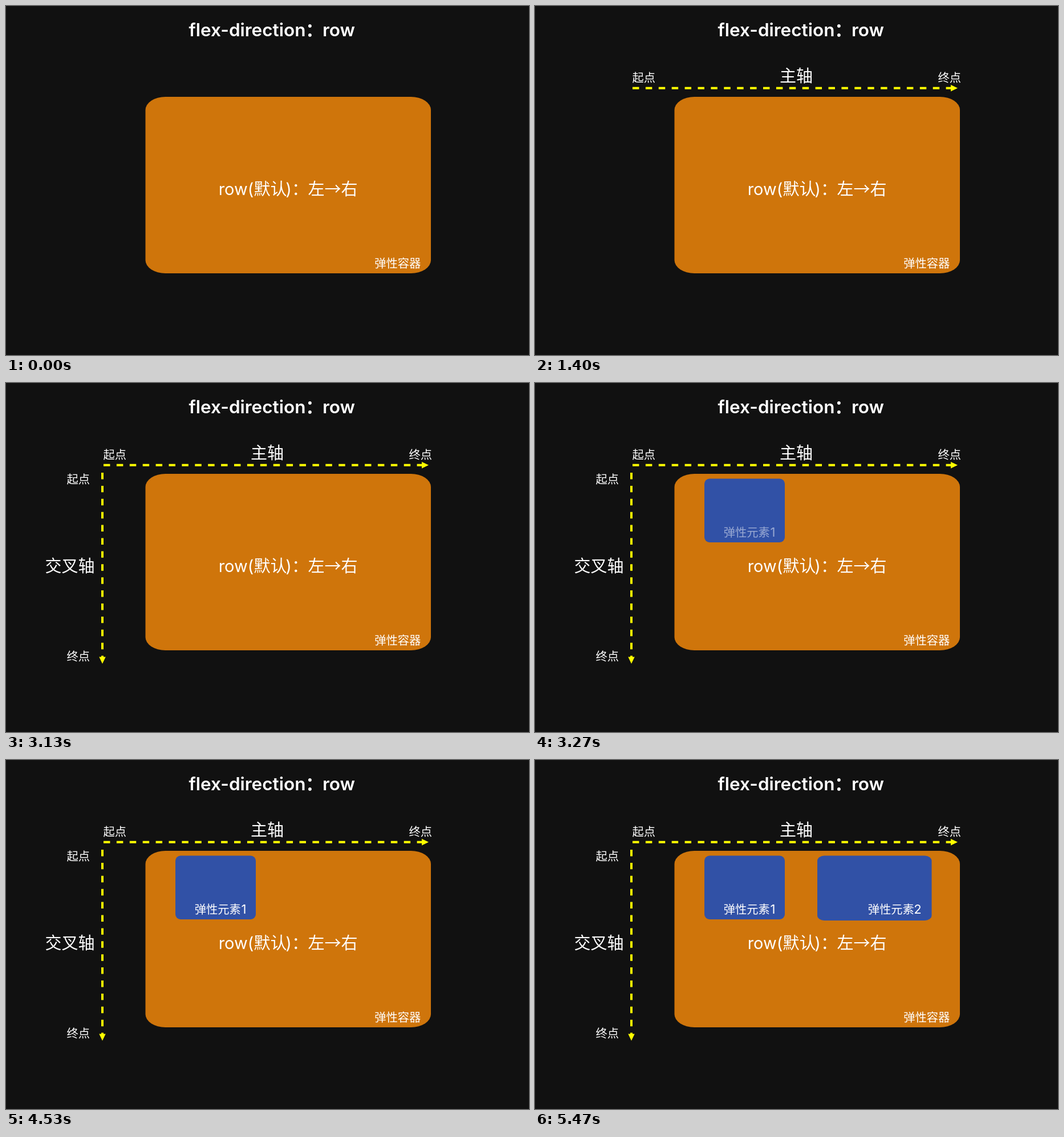
Recreate the animation shown at these times as an HTML page. Size 917 by 611 pixels, loop 5.59 s.

```html
<!DOCTYPE html>
<html lang="zh-CN">
<head>
<meta charset="utf-8">
<title>flex-direction: row</title>
<style>
  html, body { margin: 0; width: 100%; height: 100%; overflow: hidden; background: #111; }
  svg { display: block; }
  text { font: 29px "Noto Sans CJK SC", sans-serif; fill: #fff; text-anchor: middle; }
  .small { font-size: 20.3px; }
  .latin { font-family: Inter, sans-serif; }
  .digit { font-family: Inter, sans-serif; font-size: 22px; }
  .title { font-size: 31.5px; font-weight: 600; }
  .colon { text-anchor: start; }
  .axis { stroke: #ff0; stroke-width: 4; stroke-dasharray: 11.45; }
  .head { fill: #ff0; }
  .item { fill: #3151a6; }
</style>
</head>
<body>
<svg width="917" height="611" viewBox="0 0 917 611">
  <text class="latin title" x="423" y="53">flex-direction</text>
  <text class="title colon" x="525" y="53">：</text>
  <text class="latin title" x="583.5" y="53">row</text>

  <rect x="244.5" y="159" width="500.5" height="309" rx="35" ry="23" fill="#cf750b"/>
  <text class="latin" x="403.5" y="331">row(</text>
  <text x="463.5" y="331">默认</text>
  <text class="latin" x="495.5" y="331">)</text>
  <text class="colon" x="501" y="331">：</text>
  <text x="573" y="331">左→右</text>
  <text class="small" x="686.7" y="457.5">弹性容器</text>

  <g id="mainAxis">
    <path class="axis" d="M171 143.7H732"/>
    <path class="head" d="M729 138L741 143.7L729 149.4Z"/>
    <text class="small" x="190.7" y="132.5">起点</text>
    <text x="458" y="132.5">主轴</text>
    <text class="small" x="726.7" y="132.5">终点</text>
  </g>

  <g id="crossAxis">
    <path class="axis" d="M169 157V482"/>
    <path class="head" d="M163.3 479.5L169 491.5L174.7 479.5Z"/>
    <text class="small" x="126.7" y="175.5">起点</text>
    <text x="112" y="331">交叉轴</text>
    <text class="small" x="126.7" y="485.5">终点</text>
  </g>

  <g id="item1">
    <rect class="item" x="297" y="167.5" width="141" height="111.5" rx="9"/>
    <g id="label1">
      <text class="small" x="371.3" y="268.5">弹性元素</text>
      <text class="digit" x="417" y="269">1</text>
    </g>
  </g>

  <g id="item2">
    <rect class="item" x="495" y="167.5" width="200.5" height="113.5" rx="12" ry="9"/>
    <g id="label2">
      <text class="small" x="624.3" y="268.5">弹性元素</text>
      <text class="digit" x="671" y="269">2</text>
    </g>
  </g>
</svg>
<script>
  const LOOP = 5590, TICK = 1000 / 15, FADE = 6;
  const setOpacity = (id, value) => document.getElementById(id).setAttribute("opacity", value);

  // Linear fade over FADE ticks that cuts in at the given tick and level.
  const fade = (tick, start, level) =>
    tick < start ? 0 : Math.min(1, level + (tick - start) / FADE);

  function draw(now) {
    const tick = Math.floor((now % LOOP + 4) / TICK);
    setOpacity("mainAxis", fade(tick, 13, 1 / FADE));
    setOpacity("crossAxis", fade(tick, 34, 0.5));
    setOpacity("item1", tick < 49 ? 0 : 1);
    setOpacity("label1", fade(tick, 49, 0.5));
    setOpacity("item2", tick < 69 ? 0 : 1);
    setOpacity("label2", fade(tick, 69, 0.5));
  }

  const begin = performance.now();
  function loop() {
    draw(performance.now() - begin);
    requestAnimationFrame(loop);
  }
  loop();
</script>
</body>
</html>
```
